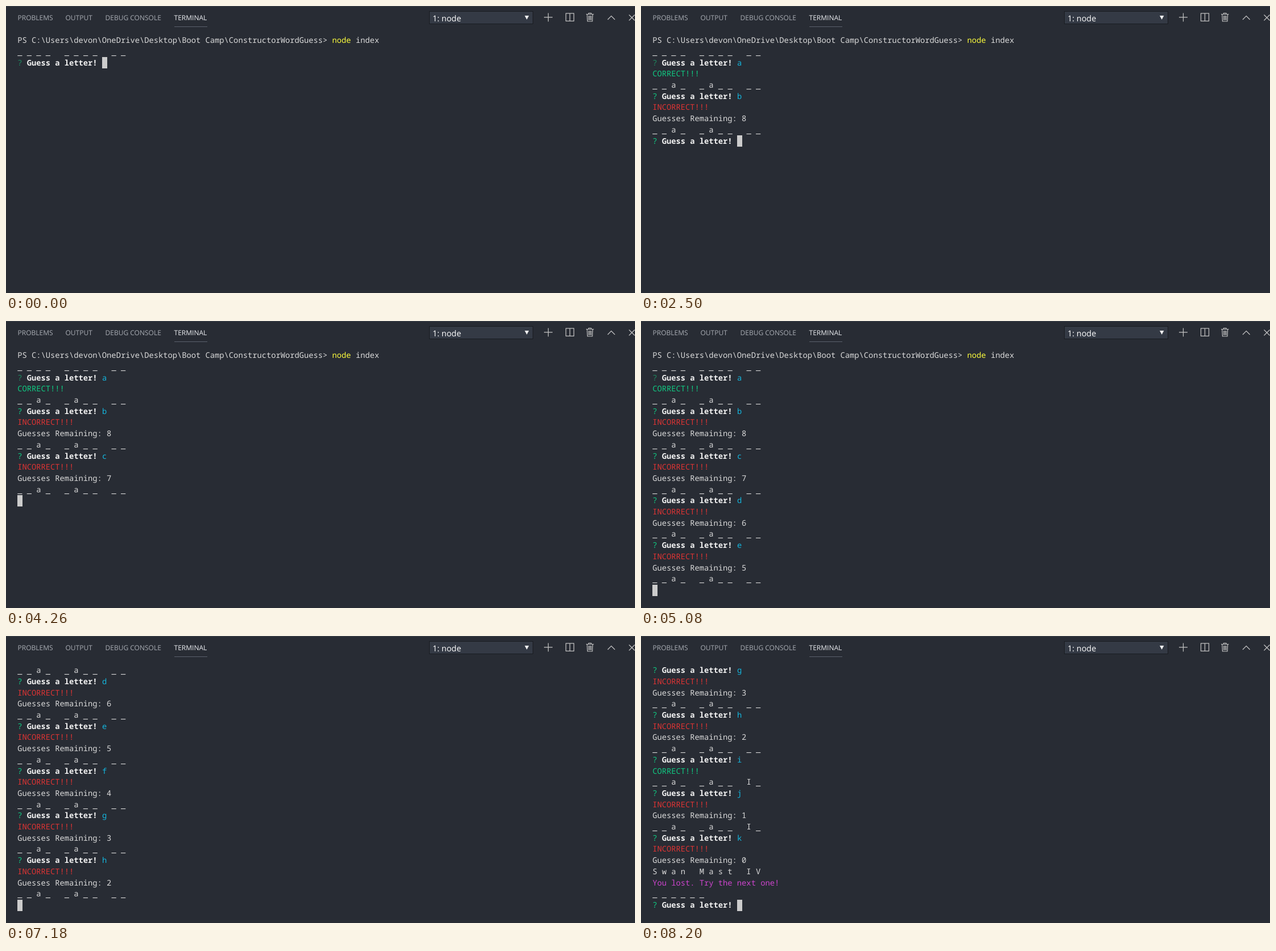
An HTML page with a canvas that plays this animation: 1106x506 px, repeating every 9.48 s.

```html
<!DOCTYPE html>
<html lang="en">
<head>
<meta charset="utf-8">
<title>Word guess in a terminal</title>
<style>
  html, body { margin: 0; width: 100%; height: 100%; overflow: hidden; background: #282c34; }
  body { position: relative; text-rendering: geometricPrecision; }
  canvas, pre, span.ui, #cursor { position: absolute; margin: 0; white-space: pre; }
  canvas { left: 0; top: 0; }
  .ui { font: 12px/19px "Open Sans", "Noto Sans", sans-serif; color: #a9adb4; top: 11px; }
  .ui.on { color: #eceef2; }
  .ui.pick { font-size: 14.4px; color: #fff; top: 13px; }
  pre {
    left: 20.2px; top: 51.2px; color: #dadada;
    font: 13.783px/19.71px "Noto Sans Mono", "DejaVu Sans Mono", monospace;
  }
  pre b { color: #f2f2f2; }
  pre u { position: relative; top: 1px; text-decoration: none; }
  .yellow { color: #fbfb3c; }
  .green { color: #10cb83; }
  .dim { color: #1f8a60; }
  .red { color: #de3434; }
  .cyan { color: #14b6de; }
  .magenta { color: #cd44cd; }
  #cursor { width: 9px; height: 20px; background: #ccc; }
</style>
</head>
<body>
<canvas id="chrome" width="1106" height="506"></canvas>
<span class="ui" style="left:20.5px">PROBLEMS</span>
<span class="ui" style="left:104.5px">OUTPUT</span>
<span class="ui" style="left:174.5px">DEBUG CONSOLE</span>
<span class="ui on" style="left:295.5px">TERMINAL</span>
<span class="ui pick" style="left:750px">1: node</span>
<div id="cursor"></div>
<pre id="screen"></pre>
<script>
const LOOP = 9480, ROWS = 22, CELL = 8.27, LINE = 19.71, LEFT = 20.2, TOP = 50.8;
const TITLE = 'Swan Mast IV', LETTERS = 'abcdefghijk', TRIES = 9;
const ASK = '? Guess a letter! ';

// Start time, guesses answered so far, state of the input line
const STEPS = [
  [0, 0, 'ask'], [190, 0, 'typed'], [1260, 1, 'ask'], [2120, 1, 'typed'],
  [2500, 2, 'ask'], [3450, 2, 'blank'], [3510, 2, 'typed'], [3680, 2, 'blank'],
  [3750, 3, 'ask'], [4090, 3, 'blank'], [4150, 3, 'typed'], [4260, 3, 'blank'],
  [4300, 4, 'ask'], [4470, 4, 'typed'], [4700, 5, 'ask'], [5080, 5, 'blank'],
  [5160, 5, 'typed'], [5390, 6, 'ask'], [5620, 6, 'typed'], [5850, 7, 'blank'],
  [5940, 7, 'ask'], [6090, 7, 'typed'], [6240, 8, 'ask'], [6950, 8, 'typed'],
  [7180, 8, 'blank'], [7250, 9, 'ask'], [7480, 9, 'typed'], [7640, 9, 'blank'],
  [7710, 10, 'ask'], [7960, 10, 'typed'], [8110, 11, 'spill'], [8200, 11, 'ask']
];

const screen = document.getElementById('screen');
const cursor = document.getElementById('cursor');

const paint = (color, text) => `<span class="${color}">${text}</span>`;
const spaced = chars => chars.join(' ').replace(/_/g, '<u>_</u>');
const word = known => spaced([...TITLE].map(c =>
  c === ' ' || known.includes(c.toLowerCase()) ? c : '_'));
const ask = first => paint(first ? 'dim' : 'green', '?') + ' <b>Guess a letter!</b> ';

function history(count) {
  const lines = [
    'PS C:\\Users\\devon\\OneDrive\\Desktop\\Boot Camp\\ConstructorWordGuess&gt; ' +
      paint('yellow', 'node') + ' index',
    word('')
  ];
  let left = TRIES;
  for (let i = 0; i < count; i++) {
    const letter = LETTERS[i];
    lines.push(ask(i === 0) + paint('cyan', letter));
    if (TITLE.toLowerCase().includes(letter)) {
      lines.push(paint('green', 'CORRECT!!!'));
    } else {
      lines.push(paint('red', 'INCORRECT!!!'), 'Guesses Remaining: ' + --left);
    }
    if (left > 0) {
      lines.push(word(LETTERS.slice(0, i + 1)));
    } else {
      lines.push(spaced([...TITLE]), paint('magenta', 'You lost. Try the next one!'),
        spaced(Array(6).fill('_')));
    }
  }
  return lines;
}

function show([, count, mode]) {
  const lines = history(count);
  const prompting = mode === 'ask' || mode === 'typed';
  const typed = mode === 'typed' ? LETTERS[count] : '';
  lines.push(prompting ? ask(count === 0) + typed : '');
  const visible = lines.slice(-(mode === 'spill' ? ROWS + 1 : ROWS));
  screen.innerHTML = visible.join('\n');
  const col = prompting ? ASK.length + typed.length : 0;
  cursor.style.left = Math.round(LEFT + col * CELL) + 'px';
  cursor.style.top = Math.round(TOP + (visible.length - 1) * LINE) + 'px';
}

function drawChrome() {
  const g = document.getElementById('chrome').getContext('2d');
  const stroke = (...paths) => {
    g.beginPath();
    for (const [x, y, ...rest] of paths) {
      g.moveTo(x, y);
      for (let i = 0; i < rest.length; i += 2) g.lineTo(rest[i], rest[i + 1]);
    }
    g.stroke();
  };
  g.fillStyle = '#3b4048';
  g.fillRect(0, 0, 1106, 1);
  g.fillStyle = '#5b616c';
  g.fillRect(296, 36, 58, 1);

  g.fillStyle = '#343a45';
  g.fillRect(744, 9, 182, 23);
  g.strokeStyle = '#191c21';
  g.strokeRect(744.5, 9.5, 182, 22);
  g.fillStyle = '#f0f0f0';
  g.beginPath();
  g.moveTo(912, 17);
  g.lineTo(919.5, 17);
  g.lineTo(915.75, 24);
  g.fill();

  g.strokeStyle = '#c5c5c5';
  g.lineWidth = 1.2;
  stroke([946, 19.8, 961, 19.8], [953.5, 12.5, 953.5, 27.5]);
  g.strokeRect(984.5, 13, 14, 13.5);
  stroke([991.5, 13, 991.5, 26.5]);
  stroke([1020, 14.5, 1033.5, 14.5], [1024.5, 14.5, 1024.5, 12.5, 1029, 12.5, 1029, 14.5],
    [1021.8, 14.5, 1022.5, 27, 1031, 27, 1031.7, 14.5],
    [1024.7, 17, 1024.7, 25], [1026.8, 17, 1026.8, 25], [1028.9, 17, 1028.9, 25]);
  stroke([1058, 24, 1064.3, 17.5, 1070.6, 24]);
  stroke([1095.5, 15.5, 1105.5, 25.5], [1105.5, 15.5, 1095.5, 25.5]);
}

let current;
function tick() {
  const t = performance.now() % LOOP;
  const step = STEPS.findLast(s => s[0] <= t);
  if (step !== current) show(current = step);
  requestAnimationFrame(tick);
}

drawChrome();
tick();
</script>
</body>
</html>
```
